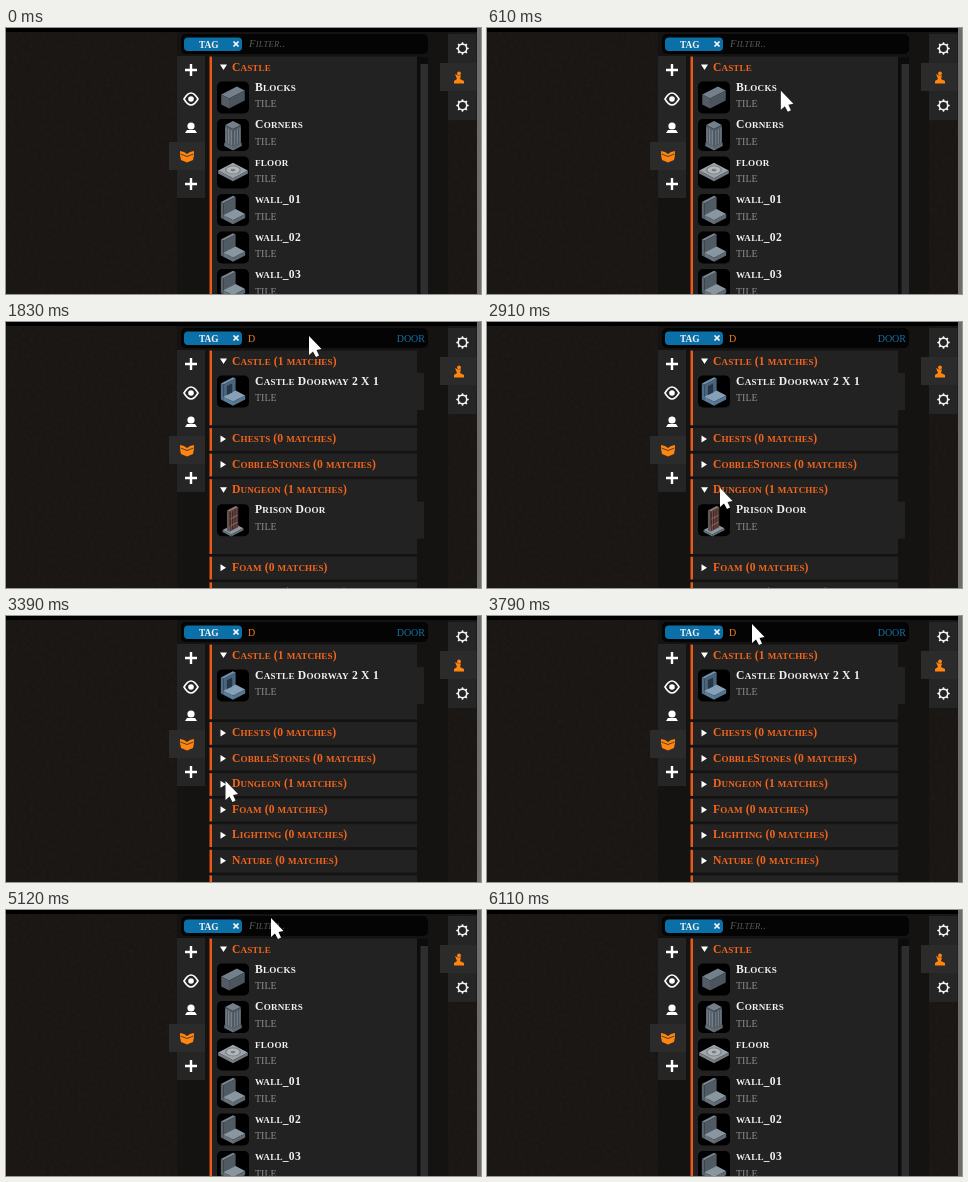
These frames come from a looping animation (475x266 px, 7190 ms). An HTML page:

```html
<!DOCTYPE html>
<html lang="en">
<head>
<meta charset="utf-8">
<title>Tile search</title>
<style>
  html, body { margin: 0; width: 100%; height: 100%; overflow: hidden; background: #191513; }
  svg { position: absolute; left: 0; top: 0; }
  text { font: bold 11.6px "Liberation Serif", "Noto Serif", serif; fill: #f2f2f2; letter-spacing: .25px; }
  .head { fill: #f4651c; letter-spacing: .1px; }
  .kind, .thin { font-weight: normal; font-size: 10px; letter-spacing: 0; }
  .kind { fill: #8c8c8c; }
  .hint { font: italic 10.5px "Liberation Serif", serif; fill: #5c5c5c; }
</style>
</head>
<body>
<svg width="475" height="266">
  <filter id="leather" x="0" y="0" width="1" height="1">
    <feTurbulence type="fractalNoise" baseFrequency=".25" numOctaves="2" seed="4"/>
    <feColorMatrix values="0 0 0 0 .3  0 0 0 0 .25  0 0 0 0 .22  .5 0 0 0 -.14"/>
  </filter>
  <rect width="475" height="266" fill="#1a1614"/>
  <rect width="475" height="266" filter="url(#leather)" opacity=".1"/>
  <path d="M171 4h271v262h-271z" fill="#151312"/>
  <path d="M0 0H475V4H0Z"/>
  <path d="M471 0h4v266h-4z" fill="#6c6c6c"/>
</svg>
<svg id="ui" width="475" height="266"></svg>
<script>
const LOOP = 7190, STEP = 65;
const $ = id => document.getElementById(id);
const rect = (x, y, w, h, fill, r = 0) =>
  `<rect x="${x}" y="${y}" width="${w}" height="${h}" rx="${r}" fill="${fill}"/>`;
const line = (d, stroke, width) => `<path d="${d}" fill="none" stroke="${stroke}" stroke-width="${width}"/>`;
const group = (id, body) => `<g id="${id}">${body}</g>`;

// Lower-case letters become slightly smaller capitals.
const text = (x, y, s, cls = '', small = 9.1) => `<text x="${x}" y="${y}" class="${cls}">` +
  s.replace(/[a-z]+/g, m => `<tspan font-size="${small}">${m.toUpperCase()}</tspan>`) + '</text>';

// Isometric box inside a 32 px thumbnail: corner, size, colour.
function box(x, y, z, w, d, h, light = 40, hue = 208, sat = 10) {
  const at = (i, j, k) => {
    const px = x + i * w, py = y + j * d;
    return [16 + (px - py) * .87, 16 + (px + py) * .45 - z - k * h];
  };
  const face = (shade, ...corners) => `<polygon points="${corners.map(c => at(...c)).join(' ')}"
    fill="hsl(${hue} ${sat}% ${light + shade}%)"/>`;
  return face(14, [0, 0, 1], [1, 0, 1], [1, 1, 1], [0, 1, 1]) +
    face(0, [0, 1, 0], [1, 1, 0], [1, 1, 1], [0, 1, 1]) +
    face(-3, [1, 0, 0], [1, 1, 0], [1, 1, 1], [1, 0, 1]);
}
const each = (n, f) => Array.from({ length: n }, (_, i) => f(i)).join('');
const disc = (r, fill) => `<ellipse cx="16" cy="13.5" rx="${r}" ry="${r * .55}" fill="${fill}"/>`;
const seat = (sat, light) => box(-7, -7, -8, 3, 14, 16, light, 208, sat) +
  box(-4, -7, -8, 11, 14, 4, light + 6, 208, sat);

const shapes = {
  block: box(-4.5, -9, -5, 9, 18, 10, 36),
  corner: box(-5, -5, -11, 10, 10, 3, 45) + box(-4.5, -4.5, -8, 9, 9, 18, 36) +
    each(3, i => box(4.5, i * 3 - 4, -7, .1, 1.2, 15, 54) + box(i * 3 - 4, 4.5, -7, 1.2, .1, 15, 54)),
  floor: box(-8.5, -8.5, -1, 17, 17, 3, 50, 208, 6) + disc(8, '#7d848a') + disc(6.5, '#b5b8b8') + disc(2.5, '#74808c'),
  wall: seat(10, 38),
  arch: seat(26, 42) + box(-4, -3, -4, .1, 6, 9, 24, 208, 30),
  gate: box(-5, -7, -11, 10, 14, 2, 45) + box(-2, -5, -9, 3, 10, 20, 36, 10, 14) +
    box(1, -4, -8, .1, 8, 18, 14, 8, 18) + each(3, i => box(1, i * 2.5 - 3, -8, .1, 1, 18, 52, 8, 24)) +
    each(2, i => box(1, -4, i * 7 - 4, .1, 8, 1, 52, 8, 24))
};

const item = (y, name, shape) => rect(211, y, 32, 32, '#000', 5) +
  `<g transform="translate(211 ${y})">${shapes[shape]}</g>` +
  text(249, y + 9, name) + text(249, y + 25.5, 'TILE', 'kind');

const header = (y, label, open) => text(226, y + 14, label, 'head') +
  `<path d="M-3-3.500L2.500 0L-3 3.500z" fill="#fff" transform="translate(217.5 ${y + 11}) rotate(${open ? 90 : 0})"/>`;

const panel = (y, h) => rect(206, y, 205, h, '#222') + rect(203.5, y, 2.5, h, '#e8591a');

function fullList() {
  const names = ['Blocks', 'Corners', 'floor', 'wall_01', 'wall_02', 'wall_03'];
  const kinds = ['block', 'corner', 'floor'];
  return rect(411, 29, 11, 237, '#0c0c0c') + rect(414.5, 36, 7.5, 230, '#2e2e2e') +
    panel(28.5, 238) + header(28.5, 'Castle', true) +
    names.map((name, i) => item(53.5 + i * 37.5, name, kinds[i] || 'wall')).join('');
}

function matchList(dungeonOpen) {
  const found = { Castle: ['Castle Doorway 2 X 1', 'arch'], Dungeon: ['Prison Door', 'gate'] };
  let y = 28.5;
  return ['Castle', 'Chests', 'CobbleStones', 'Dungeon', 'Foam', 'Lighting', 'Nature', ''].map(name => {
    const hit = found[name], open = hit && (name == 'Castle' || dungeonOpen);
    const top = y, h = open ? 74.8 : 22.8;
    y += h + 2.75;
    return panel(top, h) + (name && header(top, `${name} (${hit ? 1 : 0} matches)`, open)) +
      (open ? item(top + 25, ...hit) + rect(411, top + 22.5, 7, 37, '#222') : '');
  }).join('');
}

const plus = y => line(`M179 ${y}h12M185 ${y - 6}v12`, '#fff', 2.4);
const ball = (x, y, r, fill) => `<circle cx="${x}" cy="${y}" r="${r}" fill="${fill}"/>`;
const gear = y => each(8, i => `<path d="M-1.200-4h2.400l-.6-2.300h-1.200z" fill="#f2f2f2"
  transform="translate(456.5 ${y}) rotate(${i * 45})"/>`) +
  `<circle cx="456.5" cy="${y}" r="4.2" fill="none" stroke="#f2f2f2" stroke-width="1.5"/>`;

const tools = rect(171, 28, 28, 142, '#252525') + rect(163, 114, 36, 28, '#2b2b2b') + plus(42) + plus(156) +
  line('M178 71q7-12 14 0q-7 12-14 0z', '#fff', 1.6) + ball(185, 71, 2.8, '#fff') +
  ball(185, 98, 3.6, '#fff') + '<path d="M179 105l2-3h8l2 3z" fill="#fff"/>' +
  '<path d="M174 123l4 1 3 2 3-2 4-1v4l-1 5-6 2.500-6-2.500-1-5z" fill="#ff8510"/>' +
  line('M174.500 126l6.500 2.500 6.500-2.500', '#2b2b2b', .8) +
  rect(442, 6, 28.5, 86, '#252525') + rect(434, 35, 36.5, 28, '#2b2b2b') + gear(20.5) + gear(77.5) +
  ball(453, 45.5, 1.9, '#ff8510') +
  '<path d="M449 46l3 1.500h3l-1 3.500 4 2v2.500h-10v-2.500l3-2z" fill="#ff8510"/>';

const field = rect(175, 6, 247, 20, '#040404', 5) + rect(178, 9.5, 58, 13.5, '#0c70a8', 4) +
  '<text x="193" y="19.500" style="font-size:9.400px;letter-spacing:0">TAG</text>' +
  line('M227.500 13.500l5 5m0-5l-5 5', '#fff', 1.7) +
  group('hint', text(243, 19, 'Filter..', 'hint', 8.5)) +
  group('select', rect(242, 10, 7, 12, '#7e9abf')) +
  group('query', '<text class="thin" x="242" y="19.500" style="fill:#f58220">D</text>' +
    '<text class="thin" x="419" y="19.500" text-anchor="end" style="fill:#1670a6">DOOR</text>') +
  group('caret', rect(0, 10, 1, 12, '#f58220'));

$('ui').innerHTML = group('full', fullList()) + group('open', matchList(true)) +
  group('closed', matchList(false)) + tools + field +
  group('cursor', '<path d="M0 0V19L4 15.500L7 21L10 19.500L7.500 14L12.500 13z" fill="#fff"/>');

// Pointer way points: time, x, y.
const path = [
  [200, 235, 237], [750, 309, 18], [985, 309, 18], [1170, 303, 14],
  [2405, 303, 14], [2600, 326, 50], [2910, 233, 166], [3210, 219.5, 165],
  [3405, 219.5, 165], [3790, 265, 8], [5695, 265, 8], [6110, 276, 270]
];

function pointer(t) {
  const i = path.findIndex(p => p[0] > t);
  if (i < 1) return [276, 270];
  const [start, ...from] = path[i - 1], [end, ...to] = path[i];
  const f = Math.floor((t - start) / STEP) * STEP / (end - start);
  const ease = f * f * (3 - 2 * f);
  return from.map((v, k) => v + (to[k] - v) * ease);
}

const show = (id, on) => $(id).setAttribute('visibility', on ? 'visible' : 'hidden');

function draw() {
  const t = performance.now() % LOOP;
  const within = (a, b) => t >= a && t < b;
  const typed = within(1370, 4710);
  show('full', !within(1830, 5120));
  show('open', within(1830, 3390));
  show('closed', within(3390, 5120));
  show('hint', !typed);
  show('query', typed);
  show('select', within(4030, 4710));
  show('caret', within(900, 1830));
  $('caret').setAttribute('transform', `translate(${typed ? 249 : 242} 0)`);
  $('cursor').setAttribute('transform', `translate(${pointer(t)})`);
  requestAnimationFrame(draw);
}
draw();
</script>
</body>
</html>
```
